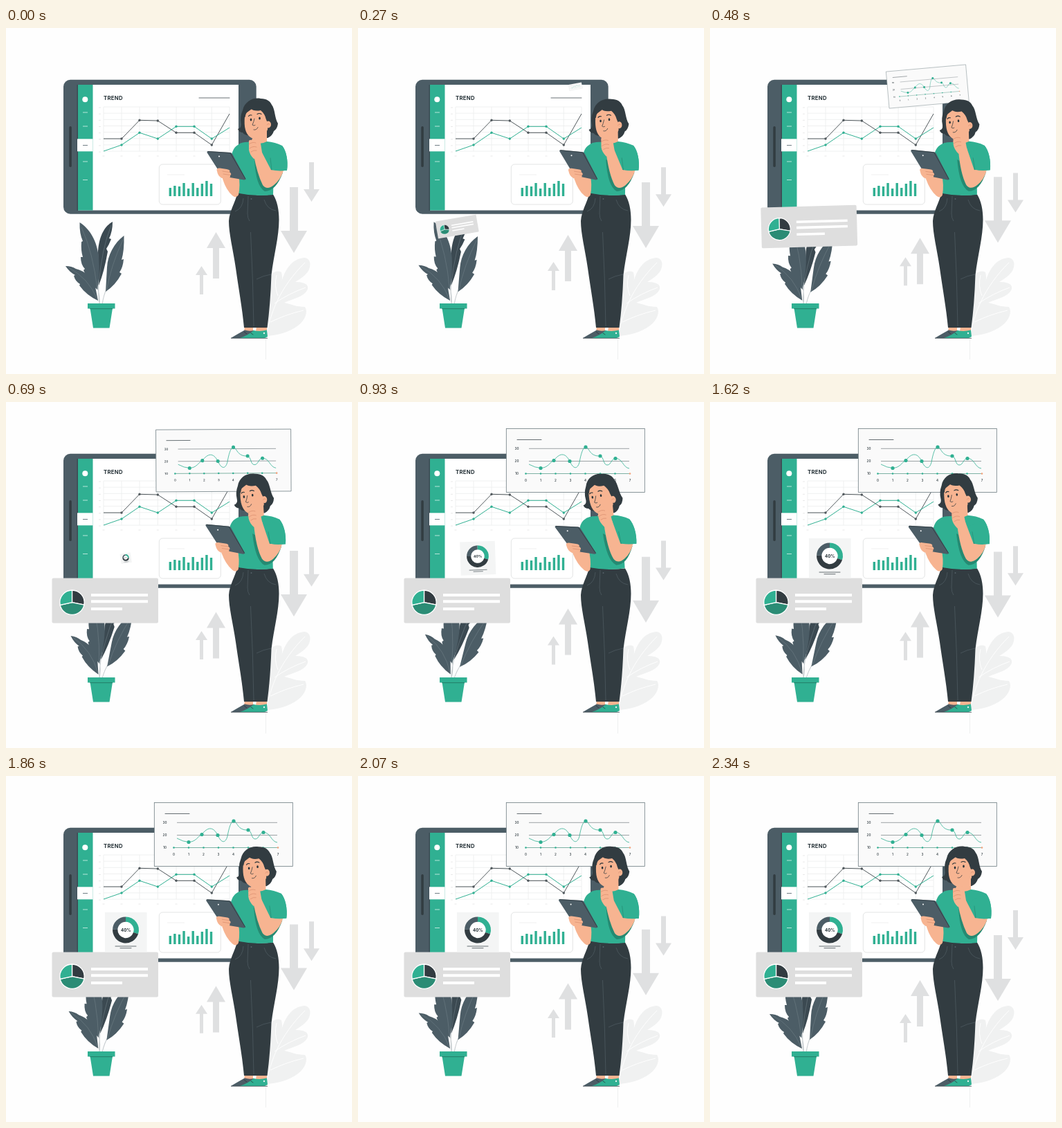
Animation, 500 px wide and 500 px high, one loop 2.37 s. Source, as an HTML page:

```html
<!DOCTYPE html>
<html lang="en">
<head>
<meta charset="utf-8">
<title>Trend analysis</title>
<style>
html, body { margin: 0; width: 100%; height: 100%; overflow: hidden; background: #fefefe; }
svg { display: block; width: 100vw; height: 100vh; }
text { font-family: Inter, Lato, sans-serif; fill: #263238; }
.g { fill: #30b092; } .s { fill: #4c5d66; } .d { fill: #323c41; } .k { fill: #f7b491; } .a { fill: #dfe0e1; }
.w { fill: #fff; }
.l { fill: none; stroke: #263238; stroke-width: .7; stroke-linecap: round; stroke-linejoin: round; }
.skin { stroke: #d98d6e; } .fold { stroke: #258a72; } .edge { stroke: #75848b; } .brow { stroke-width: 1.1; }
.mid { text-anchor: middle; }
</style>
</head>
<body>
<svg viewBox="0 0 500 500">
  <!-- foliage -->
  <g>
    <path fill="#f0f1f1" d="M377 445C375 420 375 386 384 356Q391 349 398 353Q400 361 398 368C402 351 413 333 431 332C443 333 441 349 433 356Q428 361 418 367C425 367 438 368 436 377C432 388 418 390 402 397C412 399 419 403 432 403C437 410 432 423 422 430C409 440 391 444 377 445Z"/>
    <path fill="none" stroke="#fff" stroke-width=".9" d="M376 446C382 412 395 376 432 339M382 425Q404 414 430 408M388 398Q408 384 433 375M393 387Q387 373 391 357"/>
    <path stroke="#eef0f0" d="M375.5 447V479"/>
  </g>

  <!-- arrows -->
  <path id="a0" class="a" d="M410 230H422V293H435L416 325L397 293H410Z"/>
  <path id="a1" class="a" d="M438 194H445V233H453L441.5 251L430 233H438Z"/>
  <path id="a2" class="a" d="M303.5 295L317 318H308V362H299V318H290Z"/>
  <path id="a3" class="a" d="M282.5 344L291 357H285V385H280V357H274Z"/>

  <!-- screen -->
  <rect class="s" x="83" y="74.700" width="278.700" height="194" rx="10"/>
  <rect x="102.500" y="82" width="2" height="182" fill="#3b4a52"/>
  <rect class="w" x="104" y="82" width="232" height="181.500"/>
  <rect class="g" x="104" y="82" width="21.500" height="181.500"/>
  <rect x="91.300" y="142" width="3.500" height="59" rx="1.700" fill="#323c41"/>
  <circle class="w" cx="114.300" cy="103.300" r="4"/>
  <rect class="w" x="103" y="160.300" width="22.500" height="18"/>
  <path stroke="#d8f3eb" stroke-width=".8" d="M111 122H118M111 142H118M111 193H118M111 219.500H118"/>
  <path stroke="#4c5d66" stroke-width=".8" d="M111 169.500H118"/>
  <text x="141" y="104.300" font-size="7.700" font-weight="700" letter-spacing=".3">TREND</text>
  <path class="l" d="M279 101H323"/>
  <path id="grid" fill="none" stroke="#ebecec" stroke-width=".8"/>
  <path id="ticks" fill="none" stroke="#e4e4e4" stroke-width=".8"/>
  <g id="plot"></g>
  <rect x="221.300" y="197" width="89" height="58" rx="5" fill="#fff" stroke="#e3e4e4"/>
  <path stroke="#efefef" d="M233 212H258"/>
  <g id="bars" class="g"></g>

  <!-- plant -->
  <g id="leaves">
    <path fill="none" stroke="#c5cbce" stroke-width="1" d="M132 374Q136 388 135 400M134 360Q133 385 135 400M146 376Q141 385 139 400"/>
    <path fill="#3b4951" d="M154 280C143 286 135 299 133 322L134 372Q142 352 147 323L145 319Q149 313 152 305L149 304Q154 294 154 280Z"/>
    <path class="s" d="M106.500 281C121 290 132 308 134 332Q136 357 132 378Q119 368 112 350L114 348Q108 342 108 331L111 331Q108 321 109 309L111 308Q106 297 106.500 281Z"/>
    <path class="s" d="M170.500 300C156 311 147 328 146 346L144 381Q158 372 167 355L164 353Q169 346 170 334L167 335Q171 322 170.500 300Z"/>
    <path class="s" d="M86 344Q95 344 101 348Q121 353 129 374L133 394Q116 386 106 372L107 370Q100 366 98 358L100 357Q92 353 86 344Z"/>
    <path fill="none" stroke="#75848b" stroke-width=".5" d="M109 288Q126 325 132 378M152 285Q138 320 134 371M169 306Q152 342 145 380M90 346Q119 361 132 392"/>
  </g>
  <path class="g" d="M118 398H157.500V405.500H118ZM121.500 405H154L149.500 433.500H126Z"/>
  <path fill="#25866f" d="M121.300 405H154.200L154 406.300H121.500Z"/>

  <!-- pie card -->
  <g id="c0">
    <rect x="66.500" y="254.500" width="153.500" height="65" rx="2" fill="#dedede"/>
    <g id="pie" stroke="#fff" stroke-width="1.300"></g>
    <path stroke="#fff" stroke-width="4" d="M123 279H205M123 288.200H205M123 299H168"/>
  </g>

  <!-- line card -->
  <g id="c1">
    <rect x="214.300" y="38.500" width="200" height="92" fill="#fafafa" stroke="#6e7d82" stroke-width=".8"/>
    <path class="l" d="M230 54.500H265"/>
    <path stroke="#858c90" stroke-width=".8" d="M247 67.300H392M247 85.500H392"/>
    <path stroke="#5fa08e" stroke-width=".8" d="M243 103.500H394"/>
    <g id="axis"></g>
    <path fill="none" stroke="#30b092" stroke-width=".8" d="M247 90Q256 95 264 95.500C275 95 277 87 283 84.500C291 74 299 72 306 85.500C311 97 317 98 320 87C322 76 325 65 329 65C334 65 334 79 350 78C356 80 354 92 361 91C366 90 366 82 372 81.500C382 81 383 95 392 96"/>
    <g id="dots" class="g"></g>
  </g>

  <!-- donut card -->
  <g id="c2">
    <rect x="143" y="197" width="60.500" height="57.500" fill="#f4f5f5"/>
    <circle cx="173" cy="222.500" r="12" fill="#fff"/>
    <g id="donut" fill="none" stroke-width="7.300"></g>
    <text class="mid" x="173.300" y="224.600" font-size="6.200" font-weight="700">40%</text>
    <path class="l" d="M158 246H188M165 248.700H181"/>
  </g>

  <!-- legs -->
  <path class="k" d="M345 431H357V439H344ZM362 431H377V439H361Z"/>
  <path class="s" d="M325 448Q335 442 345 436.500Q351 438.500 358 437L361 445L351 448Z"/>
  <path class="g" d="M338 448Q350 444 358 437Q367 439 377 436.500L378 446L374 448Z"/>
  <path stroke="#263238" stroke-width=".7" d="M325 448.300H378"/>
  <circle cx="373" cy="441" r="1.200" fill="#e5f5f0"/>
  <path class="l" d="M344 439L348 442M354 441L357 443"/>
  <path class="d" d="M334.500 238.500Q360 243 386 240.500C392 250 394.500 263 394.500 277C394.500 302 387 328 383.500 357Q382 400 377.500 433H344C341.500 405 336 376 332 347C328 320 322 297 322 279C323 264 331 253 334.500 238.500Z"/>
  <path fill="none" stroke="#56646b" stroke-width=".6" d="M350 243L349 268Q349 275 352 279M353.500 295Q357 365 358 431M383 356Q371 358 362 363M331 265Q342 261 343 246M390 264Q377 262 373 248"/>
  <circle cx="354.500" cy="247" r="1" fill="#56646b"/>

  <!-- torso -->
  <g id="body">
    <g id="headBack">
      <path class="d" d="M342 119C345 106 357 100 368 102C377 102 382 106 384 111C389 117 388 130 393 138Q392 146 387 149Q385 156 378 159L364 158L349 155Q344 154 342 151Q337 151 335 146Q341 144 339.500 137Q338 128 342 119Z"/>
    </g>
    <path class="k" d="M360 150L377 148V166Q371 176 353 167Z"/>
    <path class="g" d="M354 165Q341 164 335 169C328 173 326 182 324 191L331 200L337 216L334.500 238.500Q360 244 386 241L387 206H406C408 191 405 177 399 170Q389 165 377 164Q366 170 354 165Z"/>
    <path class="fold" style="stroke: none" fill="#258a72" d="M359 190Q361 229 374 236Q390 236 400 209L386 206Z"/>
    <g id="head">
      <path class="k" d="M345.500 124C343.500 139 345 149 350 155Q357 163 367 159Q374 156 378 147L379 122L362 112Z"/>
      <path class="d" d="M343 128Q341 108 363 104Q381 104 385 120L390 140L382 143Q377 137 375.500 131Q374 124 368 119Q358 121 353 116Q347 120 345.500 129Z"/>
      <ellipse class="k" cx="379" cy="139.500" rx="4" ry="5"/>
      <path class="l skin" d="M377 140Q379 137 381 139"/>
      <g id="face">
        <path class="l brow" d="M350.500 127.500Q352 125 355 126M363 124.500Q366 122.500 369 124.500"/>
        <ellipse cx="354" cy="132.500" rx="1.300" ry="1.900" fill="#263238"/>
        <ellipse cx="366.500" cy="130.500" rx="1.300" ry="1.900" fill="#263238"/>
        <path class="l" d="M359 131Q358 136 356 140Q358 142 360 140.500"/>
        <path class="l" d="M358 147Q362 148 364 143.500"/>
      </g>
    </g>
    <path class="k" d="M313 211L336 213Q339 226 336 241Q333 247 327 242Q318 234 313 218Z"/>
    <path id="arm" class="k"/>
    <g id="hand">
      <path class="k" d="M351 166Q350 161 355 162L361 159Q366 161 368 167L371 186L358 189Q352 183 351 176Z"/>
      <path class="l skin" d="M351 168Q356 164 361 166M352 174Q357 170 362 172M354 179Q358 176 362 177"/>
    </g>
    <path class="g" d="M377 180L384 205Q395 207.500 406 205.500C408 193 405 177 399 170Z"/>
    <path class="l fold" d="M382 188L384 205"/>
    <g id="tablet">
      <path class="s" d="M292 178L324 180Q326 180 327 182L346 217Q347 219.500 344 219.500L315 214.500Q312 214 311 212L290.500 180Q290 178 292 178Z"/>
      <path class="l" d="M292 178.500L324 180.500L346 218"/>
      <circle cx="308" cy="185.500" r="1" fill="#fff"/>
    </g>
    <path class="k" d="M305 207Q303 202 309 202.500L319 204Q325 205 323 208Q327 211 324 213Q325 217 319 217L312 217Q306 214 305 207Z"/>
    <path class="l skin" d="M313 207L323 208.500M314 211L324 212.500"/>
  </g>
</svg>
<script>
const LOOP = 2370;
const $ = id => document.getElementById(id);
const set = (id, v) => $(id).setAttribute('transform', v);
const range = n => [...Array(n).keys()];
const fill = (id, html) => { $(id).innerHTML = html; };
const dot = ([x, y], r, c) => `<circle cx="${x}" cy="${y}" r="${r}" ${c ? `fill="${c}"` : ''}/>`;

// Chart on the screen
const cols = [141, 167, 193, 219.3, 246, 272, 297.3, 323];
const rows = range(8).map(i => 114 + i * 9.15);
$('grid').setAttribute('d', cols.map(x => `M${x} 114V178`).join('') + rows.map(y => `M141 ${y}H323`).join(''));
$('ticks').setAttribute('d', rows.map(y => `M134 ${y + 1}h3`).join('') + cols.map(x => `M${x - 1.5} 185h3`).join(''));

function series(ys, color) {
  const pts = ys.map((y, i) => [cols[i], y]);
  return `<polyline points="${pts.join(' ')}" fill="none" stroke="${color}"/>` +
    pts.slice(1, -1).map(p => dot(p, 1.7, color)).join('');
}
fill('plot', series([160, 160, 133.3, 134, 151.3, 151.3, 169, 124], '#50585c') +
  series([178, 169, 151.3, 160, 142.3, 142.3, 160, 144], '#30b092'));

fill('bars', [231, 228, 229, 224, 232, 224, 231, 225, 221, 225]
  .map((y, i) => `<rect x="${235.6 + i * 6.58}" y="${y}" width="3.4" height="${243 - y}"/>`).join(''));

// Circular charts
const polar = (x, y, r, deg) => {
  const a = (deg - 90) * Math.PI / 180;
  return `${(x + r * Math.cos(a)).toFixed(2)} ${(y + r * Math.sin(a)).toFixed(2)}`;
};
const arc = (x, y, r, a, b) =>
  `${polar(x, y, r, a)}A${r} ${r} 0 ${b - a > 180 ? 1 : 0} 1 ${polar(x, y, r, b)}`;
fill('pie', [[0, 101, '#323c41'], [101, 258, '#2b8c75'], [258, 360, '#30b092']]
  .map(([a, b, c]) => `<path fill="${c}" d="M95.5 289.7L${arc(95.5, 289.7, 17.7, a, b)}Z"/>`).join(''));
fill('donut', [[0, 108, '#30b092'], [108, 272, '#323c41'], [272, 360, '#4c5d66']]
  .map(([a, b, c]) => `<path stroke="${c}" d="M${arc(173, 222.5, 15.3, a, b)}"/>`).join(''));

// Line card axis
const label = (x, y, s) => `<text class="mid" x="${x}" y="${y}" font-size="4.6" font-weight="500">${s}</text>`;
fill('axis', [30, 20, 10].map((n, i) => label(229.5, 69 + i * 18.1, n)).join('') +
  range(8).map(i => {
    const x = 242.5 + i * 21.5;
    return label(x, 115, i) + dot([x, 103.5], 1.3, i < 7 ? '#30b092' : '#f2a27c');
  }).join(''));
fill('dots', [[264, 95.5], [283, 84.5], [306, 85.5], [329, 65], [350, 78], [372, 81.5]].map(p => dot(p, 2.6)).join(''));

// Smooth curve through [time, value] keys, flat at both ends
function keys(k, t) {
  let i = 0;
  while (i < k.length - 2 && t > k[i + 1][0]) i++;
  const slope = j => j < 1 || j > k.length - 2 ? 0 : (k[j + 1][1] - k[j - 1][1]) / (k[j + 1][0] - k[j - 1][0]);
  const h = k[i + 1][0] - k[i][0], u = (t - k[i][0]) / h, v = 1 - u;
  return k[i][1] * (1 + 2 * u) * v * v + slope(i) * h * u * v * v +
    k[i + 1][1] * u * u * (3 - 2 * u) - slope(i + 1) * h * u * u * v;
}
const LEAN = [[0, 0], [480, .26], [690, .42], [1200, 1], [1620, .44], [1860, .15], [LOOP, 0]];
const THINK = [[0, 0], [480, .8], [690, .9], [1200, 1], [1620, .72], [1860, .15], [LOOP, 0]];

function pop(id, t, start, dur, x, y, spin) {
  const p = Math.min(1, Math.max(0, (t - start) / dur));
  const s = (1 - Math.cos(Math.PI * p)) / 2;
  $(id).style.display = s ? '' : 'none';
  set(id, `translate(${x} ${y}) rotate(${-spin * (1 - s)}) scale(${s}) translate(${-x} ${-y})`);
}

function draw(t) {
  const turn = 2 * Math.PI * t / LOOP;
  const up = (1 - Math.cos(2 * turn)) / 2;
  [-16.2, 17, 9, -14].forEach((d, i) => set('a' + i, `translate(0 ${d * up})`));
  set('leaves', `rotate(${6 * (1 - Math.cos(turn))} 136 398)`);

  pop('c0', t, 27, 570, 143.25, 287, 16);
  pop('c1', t, 151, 600, 314.3, 84.5, 12);
  pop('c2', t, 490, 600, 173.2, 225.7, 12);

  // The upper body shears and tips about the waist
  const lean = keys(LEAN, t), think = keys(THINK, t);
  const shear = .125 * lean, tip = .03 * lean;
  set('body', `matrix(1 ${-tip} ${shear} 1 ${-245 * shear} ${358 * tip})`);
  const head = `translate(0 ${2 * think}) rotate(${-2 * lean} 372 160)`;
  set('head', head);
  set('headBack', head);
  set('face', `translate(${-4.5 * think} ${2.5 * think})`);

  const hx = 4 * think, hy = -9 * think;
  set('hand', `translate(${hx} ${hy})`);
  $('arm').setAttribute('d', `M${358 + hx} ${184 + hy}L${370 + hx} ${180 + hy}L383 205L401 206Q397 219 387 227Q377 235 371 227Q363 211 ${358 + hx} ${184 + hy}Z`);
  set('tablet', `rotate(${4 * Math.max(0, Math.sin(turn)) * (1 - lean)} 344 219)`);
}

function tick(now) {
  draw(now % LOOP);
  requestAnimationFrame(tick);
}
draw(0);
requestAnimationFrame(tick);
</script>
</body>
</html>
```
